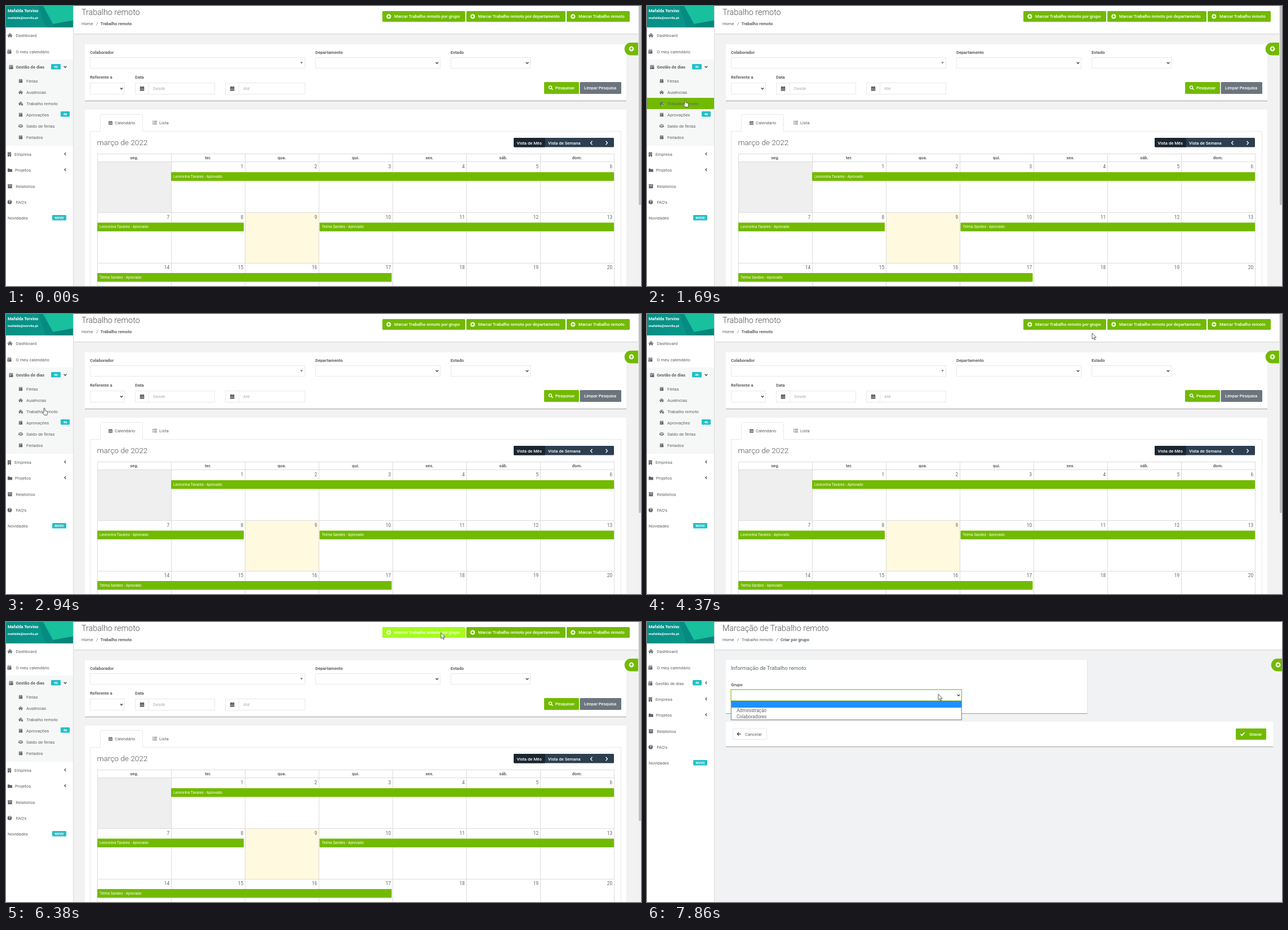
Recreate the animation shown at these times as an HTML page. Size 1127 by 497 pixels, loop 8 s.

```html
<!DOCTYPE html>
<html lang="pt">
<head>
<meta charset="utf-8">
<title>Trabalho remoto</title>
<style>
html, body { margin: 0; width: 100%; height: 100%; overflow: hidden; background: #fff; }
svg { display: block; width: 1127px; height: 497px; font-family: Roboto, Arial, sans-serif; }
.card { fill: #fff; filter: drop-shadow(.3px 1px .5px rgba(0,0,0,.36)); }
</style>
</head>
<body>
<svg id="stage" viewBox="0 0 1127 497" xmlns="http://www.w3.org/2000/svg"></svg>
<script>
const GREEN = '#72ba00', LIME = '#a5fb1f', GREY = '#5f6264', LINE = '#e7e9ea', TEAL = '#23c0c6';
const BASE = 7.63;

// Drawing helpers, each returns SVG markup
const rect = (x, y, w, h, fill, extra = '') =>
  `<rect x="${x}" y="${y}" width="${w}" height="${h}" fill="${fill}" ${extra}/>`;
const frame = (x, y, w, h, fill = '#fff', stroke = LINE, extra = '') =>
  rect(x + .5, y + .5, w - 1, h - 1, fill, `stroke="${stroke}" ${extra}`);
const card = (x, y, w, h) => rect(x, y, w, h, '#fff', 'class="card"');
// yc is the middle line of the text
const text = (x, yc, s, { size = BASE, weight = 400, fill = GREY, anchor = 'start' } = {}) =>
  `<text x="${x}" y="${yc + size * .355}" font-size="${size}" font-weight="${weight}" fill="${fill}" text-anchor="${anchor}">${s}</text>`;
const bold = (x, y, s, o = {}) => text(x, y, s, { weight: 700, ...o });
const white = (x, y, s, o = {}) => text(x, y, s, { weight: 500, fill: '#fff', ...o });
const stroke = (d, color = GREY, w = 1.2) =>
  `<path d="${d}" fill="none" stroke="${color}" stroke-width="${w}"/>`;
const group = (id, body) => `<g id="${id}">${body}</g>`;

const ICONS = {
  home: 'M-4.6 .3L0-3.9 4.6 .3 4 1 0-2.6-4 1zM-3.2 1.1L0-1.8 3.2 1.1V3.6H.8V1.4H-.8V3.6H-3.2z',
  cal: 'M-3.5-3h1.1v-1h1.1v1h2.6v-1h1.1v1h1.1v1.3h-7zM-3.5-1.1h7v4.6h-7zM-2 .2v1.4h1.6v-1.4z',
  grid: 'M-3.7-3h1.2v-1h1.1v1h2.8v-1h1.1v1h1.2v7h-7.4zM-2.8-1v1.1h1.4v-1.1zM-.7-1v1.1h1.4v-1.1zM1.4-1v1.1h1.4v-1.1zM-2.8 1.2v1.2h1.4v-1.2zM-.7 1.2v1.2h1.4v-1.2zM1.4 1.2v1.2h1.4v-1.2z',
  building: 'M-3-4h6v8h-2.2v-1.8h-1.6v1.8h-2.2zM-1.7-2.8v1.1h1.1v-1.1zM.6-2.8v1.1h1.1v-1.1zM-1.7-.6v1.1h1.1v-1.1zM.6-.6v1.1h1.1v-1.1z',
  folder: 'M-4-2.9h3l1 1h4v5h-8z',
  box: 'M-4-3.4h8v1.9h-8zM-3.6-1h7.2v4.5h-7.2zM-1.3-.3v.9h2.6v-.9z',
  plus: 'M-4 0a4 4 0 1 1 8 0a4 4 0 1 1-8 0zM-.7-2.3v1.6h-1.6v1.4h1.6v1.6h1.4v-1.6h1.6v-1.4h-1.6v-1.6z',
  scale: 'M-.5-3.5h1v.8h3.2v.8h-3.2v4.4h2v.9h-5v-.9h2v-4.4h-3.2v-.8h3.2zM-3-1.8L-1 1.2q-2 1.6-4 0zM3-1.8L5 1.2q-2 1.6-4 0z',
  list: 'M-4-3h1.5v1.2h-1.5zM-1.6-2.9h5.6v1h-5.6zM-4-.6h1.5v1.2h-1.5zM-1.6-.5h5.6v1h-5.6zM-4 1.8h1.5v1.2h-1.5zM-1.6 1.9h5.6v1h-5.6z'
};
const icon = (name, x, y, fill = GREY, k = 1) =>
  `<path d="${ICONS[name]}" transform="translate(${x} ${y}) scale(${k})" fill="${fill}" fill-rule="evenodd"/>`;
const badge = (x, y, w, h, s) =>
  rect(x, y, w, h, TEAL, 'rx="1.2"') + white(x + w / 2, y + h / 2, s, { size: 5.8, weight: 700, anchor: 'middle' });
const chevDown = (x, y) => stroke(`M${x - 2.3} ${y - 1.2}l2.3 2.4 2.3-2.4`, '#444', 1.3);
const chevLeft = (x, y) => stroke(`M${x + 1.2} ${y - 2.3}l-2.3 2.3 2.3 2.3`, '#444');
const select = (x, y, w, h) => frame(x, y, w, h) + chevDown(x + w - 6, y + h / 2);
const button = (x, y, w, h, fill, id) => rect(x, y, w, h, fill, `rx="1.5" ${id ? `id="${id}"` : ''}`);

// Sidebar
const sideTop = () =>
  rect(0, 0, 119, 497, '#fff') + rect(119, 0, 1, 497, '#dcdedf') + rect(120, 0, 1, 497, '#eff0f0') +
  rect(0, 0, 119, 38, 'url(#teal)') +
  '<path d="M58 0h10l18 38H70z" fill="#047d76" opacity=".45"/>' +
  '<path d="M66 0h53v25.5L83.500 32z" fill="#18c09e"/>' +
  '<path d="M83.500 32L119 25.500V38H87z" fill="#07857d"/>' +
  white(3, 8, 'Mafalda Torvino', { weight: 700, size: 7.5 }) +
  white(3, 20.5, 'mafalda@norvila.pt', { weight: 700, size: 6.14 }) +
  icon('home', 7, 52) + text(17.5, 52, 'Dashboard') +
  icon('cal', 6, 81) + text(17.5, 81, 'O meu calendário');

const sideLower = () =>
  icon('building', 6, 137.5) + text(15, 137.5, 'Empresa') + chevLeft(105, 136.5) +
  icon('folder', 7, 165.5) + text(16, 165.5, 'Projetos') + chevLeft(105, 164.5) +
  icon('box', 7, 194) + text(17.5, 194, 'Relatórios') +
  `<circle cx="6.500" cy="222" r="3.800" fill="${GREY}"/>` +
  white(6.5, 222, '?', { size: 6.4, weight: 700, anchor: 'middle' });

const sideEnd = () =>
  text(17.5, 222, 'FAQ\'s') + text(3, 250.5, 'Novidades') + badge(82, 245, 25, 9.5, 'NOVO');

const SUBS = [['cal', 'Férias'], ['home', 'Ausências'], ['home', 'Trabalho remoto'],
  ['cal', 'Aprovações'], ['scale', 'Saldo de férias'], ['cal', 'Feriados']];

const sideOpen = () =>
  rect(0, 95, 119, 153, '#f6f7f7') + rect(0, 0, 119, 20, GREEN, 'id="row"') +
  icon('cal', 9, 108.5) + bold(17.5, 108.5, 'Gestão de dias') +
  badge(80, 103, 17, 9.5, '46') + chevDown(105, 108) +
  SUBS.map(([name, s], i) => icon(name, 26, 133 + i * 20, GREY, .9) + text(36, 133 + i * 20, s)).join('') +
  '<circle cx="28.500" cy="175" r="1.900" fill="#5f6264" stroke="#f6f7f7" stroke-width=".6"/>' +
  badge(97, 187, 16, 9.5, '46') +
  `<g transform="translate(0 126)">${sideLower()}${sideEnd()}</g>`;

const sideClosed = () =>
  icon('cal', 6, 109) + text(15, 109, 'Gestão de dias') + badge(81, 103, 16, 9.5, '46') +
  chevLeft(105, 108) + sideLower() + group('sideEnd', sideEnd());

// Page bodies
const header = (w) => rect(120, 49, w, 1, '#d9dadb') + rect(120, 50, w, 1, '#e7e8e8') + rect(121, 0, w - 1, 49, '#fff');
const title = (s) => text(134, 11, s, { size: 14.3, weight: 300, fill: '#4f5254' });
const plusTab = (x, w) =>
  `<path d="M${x + 11} 65h${w - 11}v22.500h-${w - 11}a11.250 11.250 0 0 1 0-22.500z" fill="${GREEN}"/>` +
  icon('plus', x + 12, 76, '#fff', 1.1);
const topButton = (x, w, s, id) =>
  button(x, 9, w, 19, GREEN, id) + icon('plus', x + 11.3, 18.5, '#fff') + white(x + 21, 18.8, s, { size: 7.58 });
const dateField = (x, s) =>
  frame(x, 136, 142, 21) + rect(x + 24, 136, 1, 21, LINE) + icon('grid', x + 12.5, 146.5, '#444') +
  text(x + 32, 146, s, { fill: '#a9acae' });

const filters = () =>
  card(140, 68, 961, 100) +
  bold(149, 82, 'Colaborador') + frame(149, 91, 382, 20) + '<path d="M522 99.500h5l-2.500 3z" fill="#777"/>' +
  bold(549, 82, 'Departamento') + select(549, 91, 222, 20) +
  bold(789, 82, 'Estado') + select(789, 91, 142, 20) +
  bold(149, 126.5, 'Referente a') + select(149, 136, 62, 21) +
  bold(229, 126.5, 'Data') + dateField(229, 'Desde') + dateField(389, 'Até') +
  button(955, 135, 62, 21, GREEN, 'search') +
  '<circle cx="966" cy="144.300" r="2.500" fill="none" stroke="#fff" stroke-width="1.300"/>' + stroke('M968 146.200l2.600 2.600', '#fff', 1.5) +
  white(975, 145.3, 'Pesquisar') + button(1018.5, 135, 73.5, 21, '#6c757d') + white(1026, 145.3, 'Limpar Pesquisa');

const DAYS = ['seg.', 'ter.', 'qua.', 'qui.', 'sex.', 'sáb.', 'dom.'];
const event = (x, y, w, s) =>
  rect(x, y, w, 15.5, GREEN, 'rx="1"') + white(x + 4, y + 7.5, s, { size: 6.58, weight: 400 });

function calendar() {
  let out = card(140, 184, 961, 330) + rect(149, 222, 943, 1, LINE) +
    rect(149, 222, 1, 275, LINE) + rect(1091, 222, 1, 275, LINE) +
    stroke('M167.500 223v-28.500q0-2 2-2h71q2 0 2 2V223', LINE, 1) + rect(168, 222, 74, 1, '#fff') +
    icon('grid', 185.5, 207.5, GREY, .9) + text(193, 207.3, 'Calendário') + icon('list', 264, 207) + text(272, 207.3, 'Lista') +
    text(161.5, 242, 'março de 2022', { size: 13.6, weight: 300, fill: '#4f5254' }) +
    button(901, 234, 178, 16.5, '#2c3e50') + button(901, 234, 56, 16.5, '#1a252f') +
    white(906.5, 243, 'Vista de Mês') + white(962, 243, 'Vista de Semana') +
    stroke('M1040.500 239.800l-3 3.200 3 3.200M1064.500 239.800l3 3.200-3 3.200', '#fff', 1.3) +
    rect(162, 276, 131, 90, '#efefef') + rect(424, 366, 131, 90, '#fef9df');
  for (const y of [262, 276, 366, 456]) out += rect(162, y, 918, 1, '#dcdcdc');
  for (let c = 0; c < 8; c++) out += rect(162 + c * 131, 262, 1, 235, '#dcdcdc');
  DAYS.forEach((d, c) => out += bold(227.5 + c * 131, 269.5, d, { anchor: 'middle' }));
  for (let n = 1; n <= 20; n++) {
    const col = n % 7, row = Math.floor(n / 7);
    out += text(290 + col * 131, 285 + row * 89.7, n, { size: 8.2, anchor: 'end' });
  }
  return out +
    event(293, 295, 786, 'Leonorina Tavares - Aprovado') +
    event(162, 384.5, 260, 'Leonorina Tavares - Aprovado') +
    event(556.5, 384.5, 522.5, 'Telma Sandes - Aprovado') +
    event(162, 474, 522.5, 'Telma Sandes - Aprovado');
}

const listPage = () =>
  rect(120, 0, 1007, 497, '#f2f2f2') + header(1002) + title('Trabalho remoto') +
  text(134, 31, 'Home') + text(160, 31, '/') + bold(167.5, 31, 'Trabalho remoto', { size: 7.5 }) +
  topButton(668, 147, 'Marcar Trabalho remoto por grupo', 'byGroup') +
  topButton(817, 176, 'Marcar Trabalho remoto por departamento') +
  topButton(995, 112, 'Marcar Trabalho remoto') +
  filters() + calendar() + plusTab(1098, 24) +
  rect(1122, 0, 5, 497, '#f1f1f1') + rect(1123, 0, 4, 353, '#c1c1c1');

const formBody = () =>
  title('Marcação de Trabalho remoto') +
  text(134, 31, 'Home') + text(160, 31, '/') + text(168, 31, 'Trabalho remoto') + text(229, 31, '/') +
  bold(237, 31, 'Criar por grupo', { size: 7.5 }) +
  card(140, 67.5, 641.5, 94.5) + text(149, 82, 'Informação de Trabalho remoto', { size: 9.5 }) +
  bold(149, 111, 'Grupo') + select(148.5, 119.5, 410.5, 21) +
  card(140, 177, 971, 44) + frame(152, 189, 61, 20, '#fff', LINE, 'rx="1.500"') +
  stroke('M166.500 198.800h-6M163.200 195.800l-3 3 3 3', '#444', 1.3) + text(174, 199, 'Cancelar') +
  button(1045, 189, 54, 20, GREEN) + stroke('M1053.500 198.800l2.400 2.400 4.800-5', '#fff', 1.7) + white(1069, 199, 'Gravar') +
  plusTab(1108, 19) +
  group('focus', frame(148.5, 119.5, 410.5, 21, 'none', GREEN)) +
  group('menu', frame(148.8, 140, 410, 34.2, '#fff', '#777') + rect(149.5, 140.7, 408.8, 11.3, '#1e90ff') +
    text(159, 157, 'Administração', { size: 8.2 }) + text(159, 167.8, 'Colaboradores', { size: 8.2 }));

const HAND = 'M-1 1a1 1 0 0 1 2 0V4.600l3.400.9q1.400.4 1.200 2L4.800 12.500H.2L-3.300 8.300q-.3-1.400 1-1.200L-1 8.100Z';
const ARROW = 'M0 0V10.400L2.400 8.200 4 11.900 5.600 11.200 4 7.600H7.200Z';
const pointer = (id, d) => `<path id="${id}" d="${d}" fill="#fff" stroke="#333" stroke-width=".8" stroke-linejoin="round"/>`;

const stage = document.getElementById('stage');
stage.innerHTML =
  '<defs><linearGradient id="teal"><stop offset="0" stop-color="#078f86"/><stop offset="1" stop-color="#0a9c8c"/></linearGradient></defs>' +
  group('blank', rect(120, 0, 1007, 497, '#fdfdfd')) +
  group('list', listPage()) +
  group('form', rect(120, 0, 1007, 497, '#f1f2f4') + header(1007) + group('formBody', formBody())) +
  sideTop() + group('open', sideOpen()) + group('closed', sideClosed()) +
  group('cursor', pointer('arrow', ARROW) + pointer('hand', HAND));

const $ = (id) => document.getElementById(id);
const show = (id, on) => $(id).setAttribute('display', on ? 'inline' : 'none');

// Pointer moves: start, end, number of steps, way points
const MOVES = [
  [200, 750, 8, [[1048, 481], [700, 380], [320, 200], [90, 115], [68, 110]]],
  [910, 1370, 7, [[68, 115], [70, 146], [67, 166]]],
  [1600, 1690, 2, [[65, 164], [68, 167]]],
  [3650, 4450, 11, [[74, 190], [100, 225], [230, 242], [460, 244], [720, 220], [920, 170], [984, 146], [940, 100], [855, 58], [790, 34], [788, 33]]],
  [4520, 4830, 5, [[788, 26], [795, 20], [784, 20]]],
  [5230, 5290, 2, [[778, 20], [772, 20]]],
  [5770, 6070, 5, [[880, 80], [1008, 123], [930, 80], [830, 35], [772, 19]]],
  [7230, 7860, 9, [[752, 24], [650, 75], [540, 122], [517, 128], [517, 128]]]
];

function pointerAt(t) {
  const move = MOVES.filter((m) => t >= m[0]).pop();
  if (!move) return null;
  const [start, end, n, pts] = move;
  const step = Math.min(n - 1, Math.floor((t - start) / (end - start) * (n - 1) + 1e-6));
  const p = step / (n - 1) * (pts.length - 1);
  const i = Math.min(pts.length - 2, Math.floor(p)), f = p - i;
  return [0, 1].map((k) => pts[i][k] + (pts[i + 1][k] - pts[i][k]) * f);
}

function rowAt(x, y) {
  if (x >= 119 || y < 95 || y >= 243) return null;
  if (y < 123) return [95, 27];
  return [123 + Math.floor((y - 123) / 20) * 20, 20];
}

const inside = (x, y, l, t, r, b) => x >= l && x < r && y >= t && y < b;

function draw(t) {
  const blank = t >= 2380 && t < 2940, form = t >= 6460, list = !blank && !form;
  const [x, y] = pointerAt(t) || [-50, -50];
  const waiting = t >= 2700 && t < 3650;
  const row = list && !waiting ? rowAt(x, y) : null;
  const overGroup = list && inside(x, y, 668, 9, 815, 28);
  const overSearch = list && inside(x, y, 955, 135, 1017, 156);
  const hand = waiting || (t < 6380 && (row || overGroup || overSearch));

  show('blank', blank);
  show('list', list);
  show('form', form);
  show('open', list);
  show('closed', !list);
  show('sideEnd', t >= 6690);
  show('formBody', t >= 6690);
  show('focus', t >= 7780);
  show('menu', t >= 7860);
  show('row', row);
  if (row) {
    $('row').setAttribute('y', row[0]);
    $('row').setAttribute('height', row[1]);
  }
  $('byGroup').setAttribute('fill', overGroup ? LIME : GREEN);
  $('search').setAttribute('fill', overSearch ? LIME : GREEN);
  $('cursor').setAttribute('transform', `translate(${x} ${y})`);
  show('hand', hand);
  show('arrow', !hand);
}

const began = performance.now();
function tick() {
  draw((performance.now() - began) % 8000);
  requestAnimationFrame(tick);
}
tick();
</script>
</body>
</html>
```
